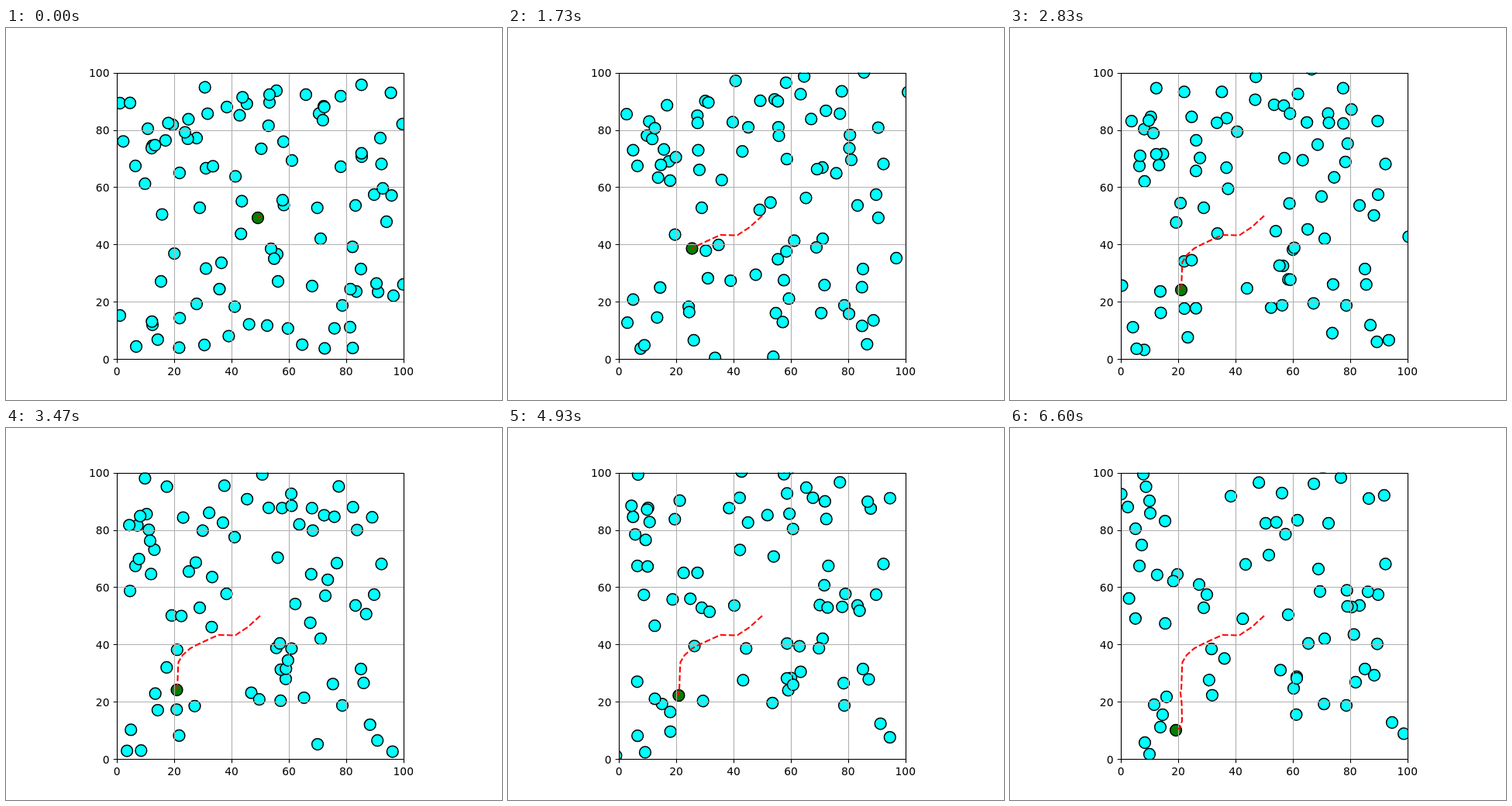
These frames come from a looping animation (640x480 px, 6630 ms). An HTML page:

```html
<!DOCTYPE html>
<html lang="en">
<head>
<meta charset="utf-8">
<title>Moving obstacles</title>
<style>
  html, body { margin: 0; width: 100%; height: 100%; overflow: hidden; background: #fff; }
  svg { display: block; width: 640px; height: 480px; }
  text { font: 13.89px "DejaVu Sans", sans-serif; }
  .grid { stroke: #b0b0b0; stroke-width: 1.11; }
  .tick, .frame { stroke: #000; stroke-width: 1.11; fill: none; }
  circle { stroke: #000; stroke-width: 1.5; }
  .trail { fill: none; stroke: #f00; stroke-width: 2.08; stroke-dasharray: 7.71 3.33; stroke-linejoin: round; }
</style>
</head>
<body>
<svg viewBox="0 0 640 480">
  <clipPath id="plot"><rect x="143.2" y="57.6" width="369.6" height="369.6"/></clipPath>
  <g id="dots" clip-path="url(#plot)"></g>
  <g id="axes"></g>
  <path id="trail" class="trail" clip-path="url(#plot)"/>
  <rect class="frame" x="143.5" y="58.5" width="370" height="369"/>
</svg>
<script>
const LOOP = 6630, LAST = 198, SIDE = 369.6, LEFT = 143.2, TOP = 57.6, BOTTOM = TOP + SIDE;
const RADIUS = 7.39;

// Nearly still obstacles: x, y
const still = [
  [167, 178], [458, 311], [451, 229], [475, 215],
  [406, 272], [484.5, 175.5], [434, 358], [250, 232]
];

// Drifting obstacles: start x, y, then end x, y
const drifting = [
  [410, 101, 411, 123], [183, 130, 180, 94], [387, 86, 351, 84],
  [432, 88, 427, 64], [452, 340, 470, 319], [444, 386, 493, 380],
  [168, 411, 180, 421], [147, 371, 174, 406], [246, 142, 244, 202],
  [189, 383, 202, 347], [200, 327, 186, 357], [258, 181, 216, 189],
  [189, 152, 152, 102], [188, 155, 181, 110], [147, 97, 170, 151],
  [224, 187, 162, 130], [340, 96, 285, 88], [285, 102, 304, 176],
  [369, 171, 334, 164], [349, 81, 330, 123], [340, 86, 371, 119],
  [459, 166, 398, 182], [432, 179, 400, 211], [491, 250, 441, 231],
  [350, 292, 385, 278], [351, 327, 370, 321], [342, 285, 366, 336],
  [337, 384, 370, 323], [395, 333, 446, 328], [483, 142, 463, 91],
  [246, 356, 197, 370], [256, 409, 194, 386], [278, 303, 254, 215]
];

const SCATTERED = 57;

// Robot route: step, x, y
const route = [
  [-1, 328, 242.4], [0, 325, 245], [9, 312, 257], [14, 304, 262], [23, 296, 267.5],
  [33, 274, 267], [40, 261, 273], [45, 250, 278], [52, 237.5, 284.5], [57, 228, 293],
  [62, 222.5, 302], [66, 222, 310], [85, 221, 338], [124, 220, 338], [140, 220, 342],
  [172, 221.5, 354.5], [190, 222, 378], [195, 219, 387], [198, 214, 390]
];

const byId = id => document.getElementById(id);

function add(parent, tag, attrs, text = "") {
  const node = document.createElementNS("http://www.w3.org/2000/svg", tag);
  for (const key in attrs) node.setAttribute(key, attrs[key]);
  node.textContent = text;
  return parent.appendChild(node);
}

function randomFrom(seed) {
  return () => (seed = (seed * 48271) % 2147483647) / 2147483647;
}

function scatter(count) {
  const random = randomFrom(2024);
  const spread = () => (random() - 0.5) * 400;
  return Array.from({ length: count }, () => {
    const x = LEFT + random() * SIDE, y = TOP + random() * SIDE;
    return [x, y, x + spread(), y + spread()];
  });
}

function drawAxes() {
  const axes = byId("axes");
  for (let value = 0; value <= 100; value += 20) {
    const offset = value / 100 * SIDE;
    const x = Math.round(LEFT + offset) + 0.5, y = Math.round(BOTTOM - offset) + 0.5;
    if (value % 100) {
      add(axes, "path", { class: "grid", d: `M${x} 58V427M143 ${y}H513` });
    }
    add(axes, "path", { class: "tick", d: `M${x} 427.5v4.86M143.5 ${y}h-4.86` });
    add(axes, "text", { x: LEFT + offset, y: 447.5, "text-anchor": "middle" }, value);
    add(axes, "text", { x: 133.5, y: BOTTOM - offset + 5.3, "text-anchor": "end" }, value);
  }
}

const mix = (a, b, t) => a + (b - a) * t;

function place(node, x, y) {
  node.setAttribute("cx", x);
  node.setAttribute("cy", y);
}

drawAxes();
const dots = byId("dots"), trail = byId("trail");
const robot = add(dots, "circle", { r: RADIUS, fill: "#008000" });
const obstacles = [...still.map(([x, y]) => [x, y, x, y]), ...drifting, ...scatter(SCATTERED)]
  .map(line => ({ line, node: add(dots, "circle", { r: RADIUS, fill: "#0ff" }) }));
dots.append(robot);

function robotAt(step) {
  const i = Math.max(1, route.findIndex(point => point[0] >= step));
  const [s0, x0, y0] = route[i - 1], [s1, x1, y1] = route[i];
  const t = (step - s0) / (s1 - s0);
  return [mix(x0, x1, t), mix(y0, y1, t)];
}

function render(ms) {
  // 30 steps per second, held on a 10 ms clock
  const step = Math.min(LAST, Math.floor((Math.floor(ms / 10) * 10 + 4) * 0.03));
  for (const { line: [x0, y0, x1, y1], node } of obstacles) {
    place(node, mix(x0, x1, step / LAST), mix(y0, y1, step / LAST));
  }
  const here = robotAt(step);
  place(robot, ...here);
  const passed = route.filter(point => point[0] < step).map(([, x, y]) => [x, y]);
  trail.setAttribute("d", "M" + [...passed, here].join("L"));
}

const start = performance.now();
function tick() {
  render((performance.now() - start) % LOOP);
  requestAnimationFrame(tick);
}
tick();
</script>
</body>
</html>
```
